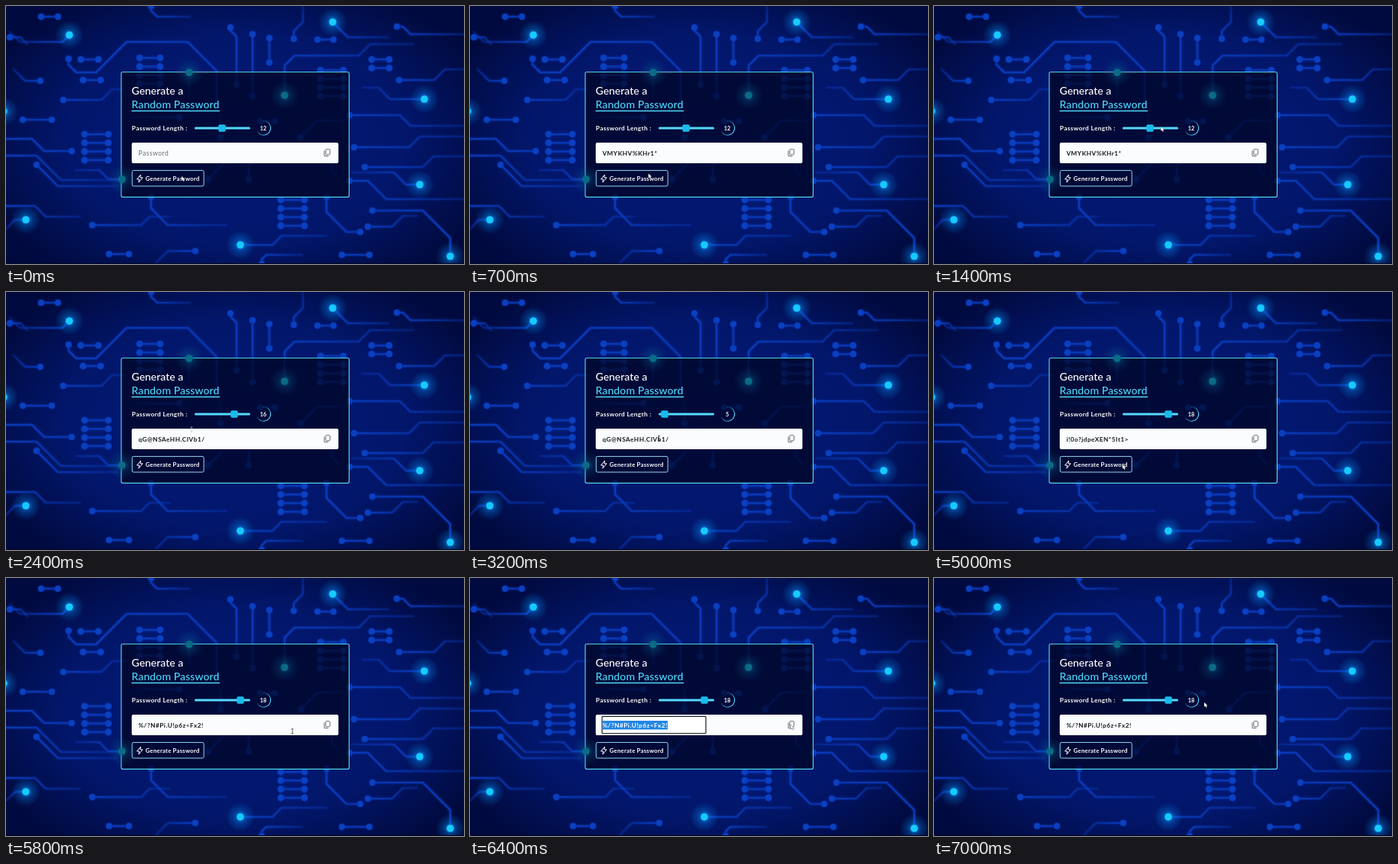
Animation, 600 px wide and 338 px high, one loop 7100 ms. Source, as an HTML page with a canvas:

```html
<!DOCTYPE html>
<html lang="en">
<head>
<meta charset="utf-8">
<title>Password generator</title>
<style>
html, body { margin: 0; width: 100%; height: 100%; overflow: hidden; background: #010a3c; }
canvas { display: block; width: 100vw; height: 100vh; }
</style>
</head>
<body>
<canvas id="stage" width="600" height="338"></canvas>
<script>
const W = 600, H = 338, LOOP = 7100, STEP = 100;
const stage = document.getElementById('stage').getContext('2d');
const CYAN = '#4fd8fb';

// Circuit traces: start node, then compass moves; a trailing * adds an end node.
const leftTraces = [
  [46, 14, 'e22 *'], [83, 38, 'sw9 w56 nw14'], [5, 41, 'e14 se10'],
  [45, 98, 'w20 nw16'], [75, 123, 'e50 ne14 e18'], [22, 149, 'e38 *'],
  [0, 174, 'e34 se16 e36 *'], [0, 196, 'e40 se32 e76'],
  [40, 208, 'se28 e78'], [152, 227, 'w18 nw12 w32'],
  [26, 280, 'w14 sw12'], [0, 262, 'e38 se14 e46'],
  [113, 287, 'e64 ne11 e28'], [135, 325, 'e26 *']
];
const topTraces = [
  [82, 69, 's8 se10 e26 ne40 e80 se38 s44 *'],
  [190, 0, 's6 se8 e44'], [240, 87, 's30'],
  [294, 28, 's4 se8 s63 *'], [323, 37, 's81 *'], [345, 42, 's32 *'],
  [377, 43, 'n10 ne12 n21'], [408, 44, 'e21 *'],
  [365, 117, 'n39 ne13 e84 ne15 e58']
];
const rightTraces = [
  [428, 21, 'se20 e54'], [512, 27, 'e8 se10 e70'],
  [515, 97, 'e46 ne14 e25'], [548, 122, 'w45 nw15 w22'],
  [450, 143, 'e66 se14 e70'], [456, 185, 'e72 ne14 e58'],
  [470, 211, 'e76 ne14 e40'], [542, 234, 'w18 nw16 w56'],
  [450, 229, 'e24 se24 e102'], [474, 289, 'e32 ne14 e20'],
  [582, 328, 'n24 nw36 w66 *']
];
const bottomTraces = [
  [190, 250, 's15 se22 e78'], [248, 321, 'w36 sw17'],
  [307, 313, 'e42 ne12 e60'], [335, 338, 'n6 ne6 e48'],
  [420, 250, 's20 se26 e18 *'], [440, 326, 'e36 *']
];
const coveredTraces = [
  [227, 146, 'w62'], [333, 151, 'e19 *'], [281, 172, 'n30'],
  [265, 227, 'ne24 n20'], [318, 227, 'n18 ne22'], [427, 190, 's26 se10'],
  [386, 172, 'ne22 e42']
];
// Dumbbell groups: left x, right x, top y, rows
const dumbbells = [
  [103, 134, 168, 4], [175, 202, 68, 4], [412, 442, 84, 4], [360, 391, 254, 4],
  [98, 121, 70, 1], [101, 124, 97, 1], [479, 502, 70, 2]
];
const lights = [[83, 38], [428, 21], [548, 122], [542, 234], [26, 280],
  [307, 313], [582, 328], [-3, 138]];
const dimLights = [[240, 87], [365, 117], [152, 227]];
const MOVES = { n: [0, -1], s: [0, 1], e: [1, 0], w: [-1, 0],
  ne: [1, -1], nw: [-1, -1], se: [1, 1], sw: [-1, 1] };

function disc(c, x, y, r) {
  c.beginPath();
  c.arc(x, y, r, 0, 7);
  c.fill();
}

function box(c, x, y, w, h, r, fill, line) {
  c.beginPath();
  c.roundRect(x, y, w, h, r);
  if (fill) { c.fillStyle = fill; c.fill(); }
  if (line) { c.strokeStyle = line; c.stroke(); }
}

// Lines fade away from their node unless they join two.
function trace(c, [startX, startY, route]) {
  let x = startX, y = startY;
  const joined = route.endsWith('*');
  c.beginPath();
  c.moveTo(x, y);
  for (const [, dir, length] of route.matchAll(/([nsew]+)(\d+)/g)) {
    x += MOVES[dir][0] * length;
    y += MOVES[dir][1] * length;
    c.lineTo(x, y);
  }
  const fade = c.createLinearGradient(startX, startY, x, y);
  fade.addColorStop(0, 'rgba(10,66,200,.75)');
  fade.addColorStop(1, `rgba(10,60,190,${joined ? 0.7 : 0.25})`);
  c.strokeStyle = fade;
  c.stroke();
  if (startX > 0) disc(c, startX, startY, 4);
  if (joined) disc(c, x, y, 4);
}

function glowingLight(c, x, y, core, rgb, strength) {
  const glow = c.createRadialGradient(x, y, 2, x, y, 19);
  glow.addColorStop(0, `rgba(${rgb},${strength})`);
  glow.addColorStop(0.4, `rgba(${rgb},${strength * 0.4})`);
  glow.addColorStop(1, `rgba(${rgb},0)`);
  c.fillStyle = glow;
  disc(c, x, y, 19);
  c.fillStyle = core;
  disc(c, x, y, 4.8);
}

function label(c, text, x, y, size, color, weight = 700, spacing = 0.3, align = 'left') {
  c.font = `${weight} ${size}px Lato, sans-serif`;
  c.letterSpacing = spacing + 'px';
  c.textAlign = align;
  c.fillStyle = color;
  c.fillText(text, x, y);
}

function drawCircuit(c) {
  c.save();
  c.translate(300, 175);
  c.scale(1, 0.62);
  const sky = c.createRadialGradient(0, 0, 20, 0, 0, 360);
  sky.addColorStop(0, '#021a78');
  sky.addColorStop(0.6, '#02166a');
  sky.addColorStop(1, '#010a3e');
  c.fillStyle = sky;
  c.fillRect(-300, -290, W, 570);
  c.restore();

  c.lineWidth = 2.6;
  c.lineJoin = 'round';
  c.fillStyle = '#0a40c0';
  c.shadowColor = '#0830a8';
  c.shadowBlur = 3;
  [leftTraces, topTraces, rightTraces, bottomTraces, coveredTraces].flat()
    .forEach(t => trace(c, t));
  c.strokeStyle = 'rgba(10,60,190,.8)';
  for (const [x1, x2, top, rows] of dumbbells) {
    for (let i = 0; i < rows; i++) {
      const y = top + i * 11.3;
      c.beginPath();
      c.moveTo(x1, y);
      c.lineTo(x2, y);
      c.stroke();
      disc(c, x1, y, 4.3);
      disc(c, x2, y, 4.3);
    }
  }
  c.shadowBlur = 0;
  for (const [x, y] of lights) glowingLight(c, x, y, '#18caff', '0,140,240', 0.75);
  c.fillStyle = '#020820';
  c.fillRect(0, 337, W, 1);
}

function drawPanel(c) {
  c.lineWidth = 1.2;
  box(c, 151, 86.5, 298.5, 163.8, 2, 'rgba(0,4,30,.7)', '#4ed5e6');
  for (const [x, y] of dimLights) glowingLight(c, x, y, '#0b6a86', '8,110,150', 0.5);
  label(c, 'Generate a', 164.5, 116, 14, '#fff', 500, 0);
  label(c, 'Random Password', 164.5, 134, 14, CYAN, 500, 0.1);
  c.fillStyle = CYAN;
  c.fillRect(164.5, 136.7, 115.5, 1.5);
  label(c, 'Password Length :', 164.8, 163.2, 8.3, '#fff', 700, 0.35);

  box(c, 247, 158.6, 73, 3, 1.5, '#56d9fb');
  // Tapered ring around the length
  c.save();
  c.translate(337.8, 160);
  c.rotate(0.5);
  c.fillStyle = CYAN;
  c.beginPath();
  c.arc(0, 0, 9.5, -2.2, 2.2);
  c.arc(-0.7, 0, 9, 2.2, -2.2, true);
  c.fill();
  c.restore();

  box(c, 164.7, 179, 270.8, 27, 2, '#fbfcfd');
  c.lineWidth = 1;
  box(c, 165.2, 215.4, 94, 20.6, 2, null, '#8ed9f0');
  label(c, 'Generate Password', 182.8, 228.8, 7.7, '#fff', 700, 0.25);
  c.strokeStyle = '#fff';
  c.stroke(new Path2D('M176.5 221 L171.5 227 H174.6 L173.8 231 L179 224.8 H175.8 Z'));
}

const backdrop = document.createElement('canvas');
backdrop.width = W;
backdrop.height = H;
drawCircuit(backdrop.getContext('2d'));
drawPanel(backdrop.getContext('2d'));

// Each entry holds from its time on.
const lengths = [[0, 12], [1500, 16], [2900, 5], [4100, 18]];
const passwords = [[0, ''], [400, 'VMYKHV%KHr1*'], [2100, 'qG@NSAeHH.CIVb1/'],
  [3500, 'tCv6*'], [4800, 'i!0o?jdpeXEN*5It1>'], [5300, '%/?N#Pi.U!p6z<Fx2!']];
const pointerPath = [[0, 230, 223], [600, 230, 223], [1300, 297, 158], [1600, 298, 158],
  [2000, 238, 224], [2200, 238, 224], [2400, 243, 180], [2700, 256, 159],
  [3000, 256, 159], [3400, 239, 224], [3600, 239, 224], [4000, 308, 161],
  [4200, 308, 161], [4700, 247, 226], [5400, 247, 226], [6000, 420, 192],
  [6500, 420, 192], [7000, 354, 163]];
const COPIED = 6200, RELEASED = 6600;

const valueAt = (track, t) => track.filter(([start]) => start <= t).pop()[1];

function pointerAt(t) {
  const next = pointerPath.findIndex(([time]) => time > t);
  if (next < 0) return pointerPath.at(-1).slice(1);
  const [t0, x0, y0] = pointerPath[next - 1], [t1, x1, y1] = pointerPath[next];
  const p = (t - t0) / (t1 - t0), ease = p * p * (3 - 2 * p);
  return [x0 + (x1 - x0) * ease, y0 + (y1 - y0) * ease];
}

function drawCopyIcon(c) {
  c.lineWidth = 0.9;
  c.strokeStyle = '#59626c';
  c.beginPath();
  c.moveTo(417, 189.5);
  c.lineTo(417, 196.6);
  c.lineTo(422.5, 196.6);
  c.stroke();
  box(c, 418.8, 187.7, 5.6, 7, 0.8, '#fbfcfd', '#59626c');
}

function drawPointer(c, x, y) {
  c.save();
  c.translate(x, y);
  c.lineWidth = 0.7;
  if (y >= 178 && y <= 206 && x < 412) {
    c.strokeStyle = y < 182 ? '#b8c8d8' : '#222';
    c.stroke(new Path2D('M-1.5 -3 H1.5 M0 -3 V3 M-1.5 3 H1.5'));
  } else {
    const arrow = new Path2D('M0 0 V5.8 L1.4 4.6 L2.4 6.7 L3.5 6.2 L2.5 4.2 H4.3 Z');
    c.fillStyle = '#fff';
    c.strokeStyle = '#10182a';
    c.stroke(arrow);
    c.fill(arrow);
  }
  c.restore();
}

function draw(t) {
  const c = stage;
  const length = valueAt(lengths, t), password = valueAt(passwords, t);
  c.drawImage(backdrop, 0, 0);
  box(c, 283 + (length - 12) * 4 - 4.7, 155.3, 9.4, 9.4, 2, '#18bbea');
  label(c, String(length), 337, 162.8, 7.2, '#fff', 700, 0, 'center');

  const selected = t >= COPIED && t < RELEASED;
  if (selected) {
    c.lineWidth = 1.2;
    box(c, 173, 181.3, 136, 22.2, 1, '#fff', '#182028');
    c.font = '700 8.2px Lato, sans-serif';
    c.letterSpacing = '0.5px';
    c.fillStyle = '#2386e2';
    c.fillRect(173.6, 187, c.measureText(password).width, 11.5);
  }
  if (password) label(c, password, 173.4, 195.6, 8.2, selected ? '#fff' : '#161a20', 700, 0.5);
  else label(c, 'Password', 173.6, 195.6, 8.5, '#6a6e74', 400, 0.5);
  drawCopyIcon(c);
  drawPointer(c, ...pointerAt(t));
}

function play() {
  const t = performance.now() % LOOP;
  draw(Math.floor(t / STEP) * STEP);
  requestAnimationFrame(play);
}
play();
</script>
</body>
</html>
```
